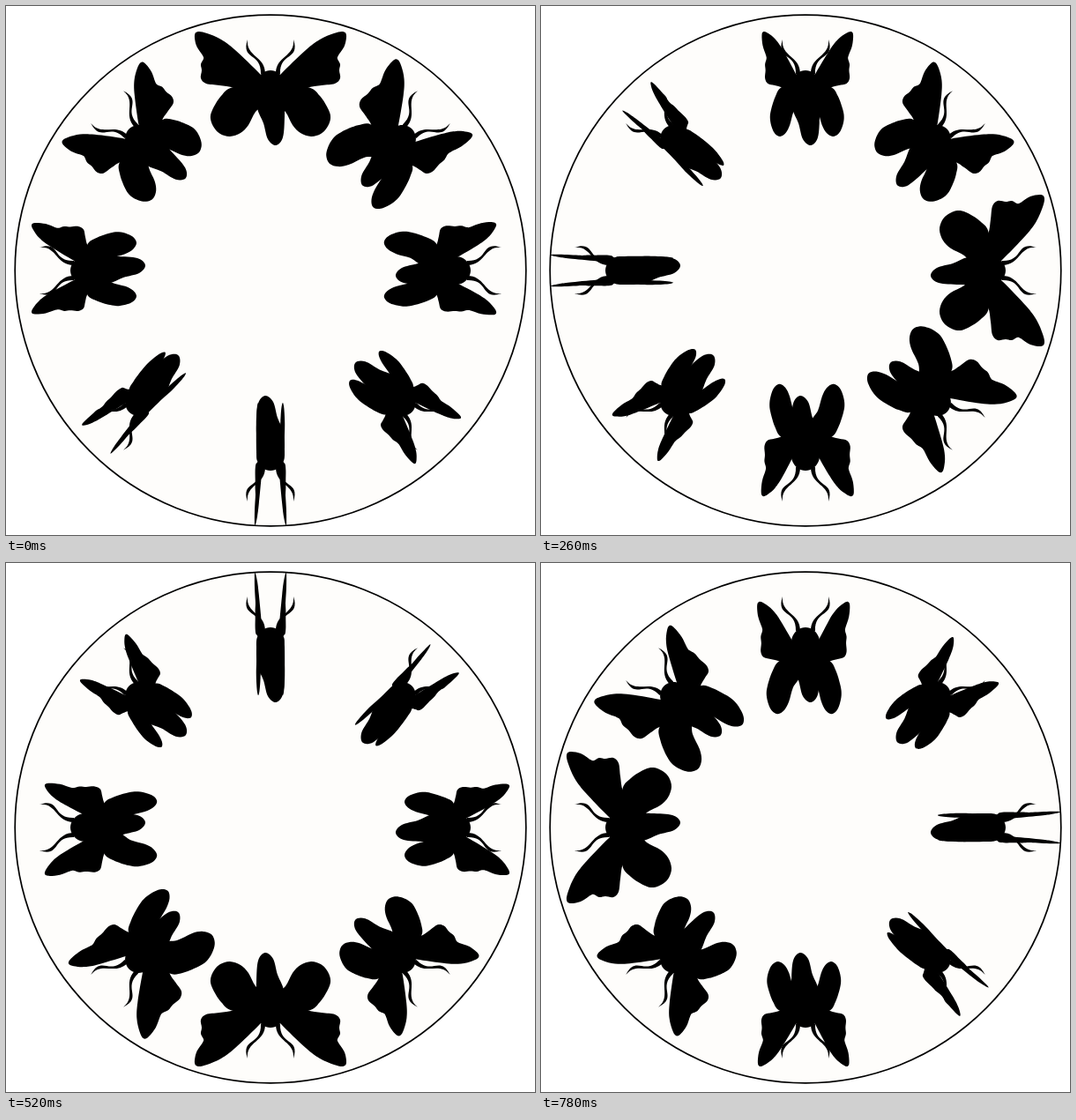
Animation, 600 px wide and 600 px high, one loop 0.91 s. Source, as an HTML page with a canvas:

```html
<!DOCTYPE html>
<html lang="en">
<head>
<meta charset="utf-8">
<title>Butterfly disc</title>
<style>
  html, body { margin: 0; width: 100%; height: 100%; overflow: hidden; background: #fff; }
  canvas { display: block; width: 600px; height: 600px; }
</style>
</head>
<body>
<canvas id="stage" width="600" height="600"></canvas>
<script>
const ctx = document.getElementById('stage').getContext('2d');
const STEP_MS = 130, STEPS = 7, EIGHTH = Math.PI / 4;
const HINGE = 10, WING_TOP = 30;

// Points are [distance from the body axis, y] with the butterfly at the top of the disc.
const UPPER_WING = [
  [4, 88], [12, 77], [40, 50], [56, 38], [72, 31], [82, 29], [86, 33], [84, 45],
  [77, 56], [76, 60], [79, 66], [78, 73], [79, 82], [73, 88], [58, 90], [41, 93], [20, 104], [3, 102]
];
const LOWER_WING = [
  [6, 92], [42, 92], [56, 102], [66, 118], [68, 128], [64, 138], [57, 145],
  [46, 148], [34, 144], [25, 135], [17, 120], [4, 108]
];
const BODY = [
  [0, 73], [9, 76], [15, 84], [16, 95], [16, 125], [14, 149], [6, 158],
  [-3, 151], [-8, 133], [-15, 116], [-16, 95], [-15, 84], [-9, 76]
];

// Clockwise around the disc: left spread, right spread, tip height, vertical stretch.
const POSES = [
  [1, 1, 30, 1],
  [0.79, 0.59, 30, 1.16],
  [0.59, 0.53, 45, 1.07],
  [0.34, 0.40, 30, 1],
  [0.107, 0.107, 12, 1.17],
  [0.12, 0.24, 26, 1.05],
  [0.52, 0.58, 30, 1],
  [0.73, 0.73, 30, 1]
];

// Closed smooth curve through the points.
function blob(points) {
  const n = points.length, at = i => points[(i + n) % n];
  ctx.beginPath();
  ctx.moveTo(...at(0));
  for (let i = 0; i < n; i++) {
    const [a, b, c, d] = [at(i - 1), at(i), at(i + 1), at(i + 2)];
    ctx.bezierCurveTo(
      b[0] + (c[0] - a[0]) / 6, b[1] + (c[1] - a[1]) / 6,
      c[0] - (d[0] - b[0]) / 6, c[1] - (d[1] - b[1]) / 6, c[0], c[1]);
  }
  ctx.fill();
}

function antenna(side) {
  ctx.beginPath();
  ctx.moveTo(side * 11, 77);
  ctx.bezierCurveTo(side * 10, 52, side * 34, 62, side * 26, 38);
  ctx.bezierCurveTo(side * 28, 58, side * 6, 56, side * 6, 77);
  ctx.fill();
}

function butterfly([left, right, top, stretch]) {
  for (const [side, spread] of [[-1, left], [1, right]]) {
    const fold = ([x, y]) => [
      side * (HINGE + spread * (x - HINGE)),
      top + stretch * (y - WING_TOP)
    ];
    blob(UPPER_WING.map(fold));
    blob(LOWER_WING.map(fold));
    antenna(side);
  }
  blob(BODY);
}

function draw() {
  const step = Math.floor(performance.now() / STEP_MS) % STEPS;
  ctx.setTransform(1, 0, 0, 1, 0, 0);
  ctx.fillStyle = '#fff';
  ctx.fillRect(0, 0, 600, 600);

  ctx.beginPath();
  ctx.arc(300, 300, 289.8, 0, Math.PI * 2);
  ctx.fillStyle = '#fefdfb';
  ctx.fill();
  ctx.lineWidth = 1.7;
  ctx.strokeStyle = '#000';
  ctx.stroke();

  ctx.fillStyle = '#000';
  POSES.forEach((pose, i) => {
    ctx.setTransform(1, 0, 0, 1, 300, 300);
    ctx.rotate((i + step) * EIGHTH);
    ctx.translate(0, -300);
    butterfly(pose);
  });
  requestAnimationFrame(draw);
}
draw();
</script>
</body>
</html>
```
